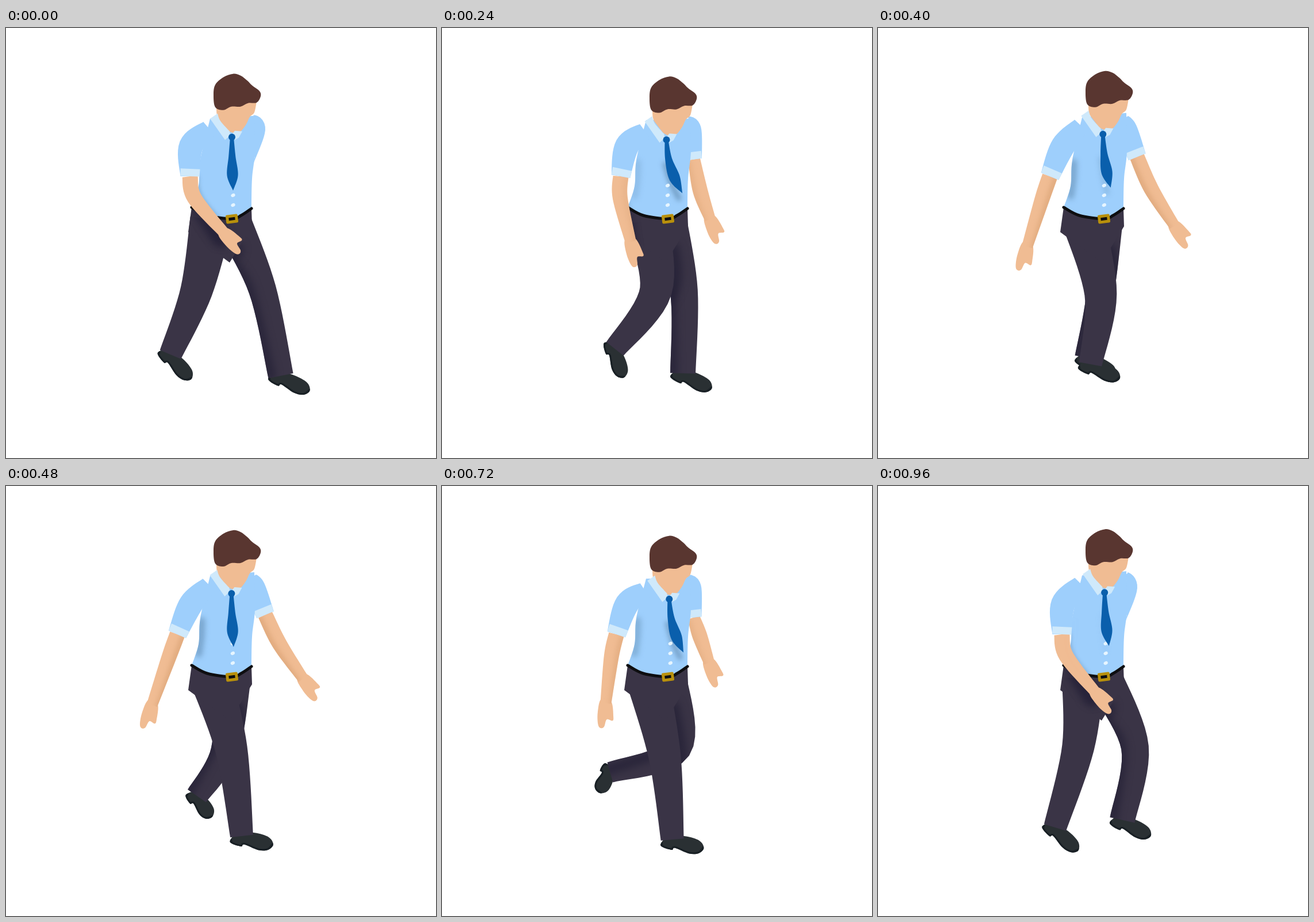
Recreate the animation shown at these times as an HTML page with a canvas. Size 748 by 748 pixels, loop 1040 ms.

```html
<!DOCTYPE html>
<html lang="en">
<head>
<meta charset="utf-8">
<title>Walk cycle</title>
<style>
html, body { margin: 0; width: 100%; height: 100%; overflow: hidden; background: #fff; }
canvas { display: block; width: 100vw; height: 100vh; }
</style>
</head>
<body>
<canvas id="stage" width="748" height="748"></canvas>
<script>
const ctx = document.getElementById('stage').getContext('2d');
const STEP = 80, STEPS = 13, TAU = Math.PI * 2;
const C = {
  shirt: '#9ecffc', cuff: '#cfe9fb', skin: '#f0bc93', hair: '#593630',
  pants: '#3a3446', shoe: '#2a3033', sole: '#192025', tie: '#0a5fac',
  belt: '#0e0e10', gold: '#b8900c', button: '#e6f5ff',
  pantsShade: '#262238', shirtShade: '#6d98be', skinShade: '#d39b6c'
};

// Each leg: hip and half widths, least foot tilt, and the path of knee and ankle.
const NEAR = {
  hip: [357, 335], widths: [37, 28, 20], tilt: 6,
  path: [[331,458, 286,568], [360,448, 286,562], [381,468, 326,561], [392,458, 410,609],
    [399,463, 425,610], [372,475, 367,617], [348,455, 308,594]]
};
const FAR = {
  hip: [394, 335], widths: [32, 24, 22], tilt: 18,
  path: [[446,455, 478,605], [441,460, 440,595], [399,455, 395,600], [380,462, 332,539],
    [383,443, 276,473], [437,470, 328,537], [447,455, 425,581]]
};

// Outlines; the shoe is relative to the ankle, the hand to the wrist.
const HAIR = [[395,78],[378,84],[364,97],[361,115],[364,136],[378,141],[392,135],[408,135],
  [421,129],[436,128],[443,117],[441,108],[428,98],[420,90],[408,81]];
const FACE = [[366,130],[367,150],[374,162],[388,178],[405,180],[417,167],[424,153],[432,145],[436,126]];
const SHOE = [[-19,9],[-7,-5],[22,-8],[47,-3],[56,9],[48,19],[31,21],[6,14],[1,18],[-15,15]];
const HAND = [[-6,-9],[18,-12],[38,-9],[44,-4],[41,2],[28,5],[29,15],[22,16],[-4,9]];

const add = (p, x, y) => [p[0] + x, p[1] + y];
const mix = (a, b, t) => a.map((v, i) => v + (b[i] - v) * t);
const clamp = (v, lo, hi) => Math.max(lo, Math.min(hi, v));
const unit = (a, b) => {
  const x = b[0] - a[0], y = b[1] - a[1], l = Math.hypot(x, y) || 1;
  return [x / l, y / l];
};
// Maps local points to the stage: x runs along u, y to its right-hand side.
const place = (pts, o, u, sx = 1, sy = 1) =>
  pts.map(([x, y]) => add(o, x * sx * u[0] - y * sy * u[1], x * sx * u[1] + y * sy * u[0]));

// Catmull-Rom value at u along a list of nodes.
function sample(nodes, u, loop) {
  const n = nodes.length, k = Math.min(Math.floor(u), loop ? n : n - 2), f = u - k;
  const at = i => nodes[loop ? (i + n) % n : clamp(i, 0, n - 1)];
  const [a, b, c, d] = [at(k - 1), at(k), at(k + 1), at(k + 2)];
  return b.map((v, i) => v + f / 2 * (c[i] - a[i]
    + f * (2 * a[i] - 5 * v + 4 * c[i] - d[i] + f * (3 * (v - c[i]) + d[i] - a[i]))));
}

// Tapered shape around a smooth centre line of [x, y, half width] nodes.
function limb(nodes) {
  const count = (nodes.length - 1) * 10, pts = [], left = [], right = [];
  for (let i = 0; i <= count; i++) pts.push(sample(nodes, i / 10));
  pts.forEach((p, i) => {
    const [x, y] = unit(pts[Math.max(0, i - 1)], pts[Math.min(count, i + 1)]);
    left.push(add(p, -y * p[2], x * p[2]));
    right.unshift(add(p, y * p[2], -x * p[2]));
  });
  const path = new Path2D();
  [...left, ...right].forEach(p => path.lineTo(p[0], p[1]));
  path.closePath();
  return path;
}
function curve(path, p, closed) {
  const n = p.length;
  const at = k => closed ? p[(k + n) % n] : p[clamp(k, 0, n - 1)];
  for (let k = 0; k < (closed ? n : n - 1); k++) {
    const [a, b, c, d] = [at(k - 1), at(k), at(k + 1), at(k + 2)];
    path.bezierCurveTo(b[0] + (c[0] - a[0]) / 6, b[1] + (c[1] - a[1]) / 6,
      c[0] - (d[0] - b[0]) / 6, c[1] - (d[1] - b[1]) / 6, c[0], c[1]);
  }
}
// Closed outline from smooth runs joined by straight lines.
function outline(...runs) {
  const path = new Path2D();
  runs.forEach(run => {
    path.lineTo(...run[0]);
    curve(path, run);
  });
  path.closePath();
  return path;
}
function blob(p) {
  const path = new Path2D();
  path.moveTo(...p[0]);
  curve(path, p, true);
  return path;
}
function fill(path, color) {
  ctx.fillStyle = color;
  ctx.fill(path);
}
function dot(x, y, rx, ry, turn, color) {
  const path = new Path2D();
  path.ellipse(x, y, rx, ry, turn, 0, TAU);
  fill(path, color);
}
function line(pts, color, width) {
  const path = new Path2D();
  path.moveTo(...pts[0]);
  curve(path, pts);
  ctx.strokeStyle = color;
  ctx.lineWidth = width;
  ctx.lineCap = ctx.lineJoin = 'round';
  ctx.stroke(path);
}
function shade(clip, pts, color, width, alpha, blur = 5) {
  ctx.save();
  ctx.clip(clip);
  ctx.globalAlpha = clamp(alpha, 0, 1);
  ctx.filter = `blur(${blur}px)`;
  line(pts, color, width);
  ctx.restore();
}

function poseLeg({ hip, widths, tilt, path }, step) {
  const [kx, ky, ax, ay] = sample(path, step / 2, true);
  const size = clamp(1 - (570 - ay) / 150, .7, 1);
  const angle = Math.max(tilt, .88 * (kx - ax)) * TAU / 360;
  const shape = limb([[...hip, widths[0]], [kx, ky, widths[1]], [ax, ay, widths[2] * (.4 + .6 * size)]]);
  return { knee: [kx, ky], ankle: [ax, ay], size, angle, shape };
}
function drawLeg({ ankle, size, angle, shape }) {
  const pts = place(SHOE, ankle, [Math.cos(angle), Math.sin(angle)], size), shoe = blob(pts);
  fill(shoe, C.shoe);
  ctx.save();
  ctx.clip(shoe);
  line([...pts.slice(4), pts[0]], C.sole, 6);
  ctx.restore();
  fill(shape, C.pants);
}

function drawArm({ neck, shoulder, cuff, elbow, wrist, side, swing }) {
  const skin = limb([[cuff[0], cuff[1], cuff[2] - 3], [...elbow, 13], [...wrist, 9.5]]);
  fill(skin, C.skin);
  fill(blob(place(HAND, wrist, unit(elbow, wrist), 1, -1)), C.skin);
  shade(skin, [cuff, elbow, wrist].map(p => add(p, side * 11, 4)), C.skinShade, 8, swing * .7);
  fill(limb([neck, shoulder, cuff]), C.shirt);
  const u = unit(shoulder, cuff);
  fill(limb([[cuff[0] - u[0] * 13, cuff[1] - u[1] * 13, cuff[2] + .5], cuff]), C.cuff);
}

// 0 with the arm forward, 1 with it swung out, eased at both ends.
function swingAt(t, peak) {
  const s = .5 + .5 * Math.cos(TAU * (t - peak));
  return s * s * (3 - 2 * s);
}

function draw(step) {
  const t = step / STEPS, wave = Math.sin(TAU * t);
  const bob = 3.3 + 6.5 * Math.cos(2 * TAU * (t - .145));
  const knot = [393 - 2.5 * wave, 188 + bob];
  const tieSwing = 15 - 13 * Math.cos(2 * TAU * t);
  const out = swingAt(t, .5), back = swingAt(t, .46);

  const near = poseLeg(NEAR, step), far = poseLeg(FAR, step);
  const nearArm = {
    neck: [353, 173 + bob, 15], shoulder: [322, 205, 21], cuff: [320 - 22 * out, 258, 16.5],
    elbow: [328 - 44 * out, 296], wrist: [380 - 126 * out, 357 + 24 * Math.sqrt(out)],
    side: 1, swing: out
  };
  const farArm = {
    neck: [423, 163 + bob, 14], shoulder: [432, 177, 19], cuff: [420 + 31 * back, 235 - 11 * back, 10 + 6 * back],
    elbow: [410 + 66 * back, 272 + 12 * wave],
    wrist: [392 + 125 * back, 305 + back * (25 + 22 * wave)], side: -1, swing: back
  };

  ctx.fillStyle = '#fff';
  ctx.fillRect(0, 0, 748, 748);
  drawArm(farArm);

  // trousers
  drawLeg(far);
  shade(far.shape, [[388, 405], add(far.knee, -24, 0), add(far.ankle, -18, 0)], C.pantsShade, 18, .8, 7);
  shade(far.shape, [[402, 385], add(near.knee, 28, 0), add(near.ankle, 20, 0)], C.pantsShade, 22, .8, 7);
  drawLeg(near);
  const buckle = [393, 332];
  const hem = [[323, 312], [350, 326], buckle, [409, 326], [427, 314]];
  const pelvis = outline(hem, [[428, 345]], [[389, 408]], [[317, 355]]);
  fill(pelvis, C.pants);
  for (const part of [pelvis, near.shape])
    shade(part, [nearArm.elbow, add(nearArm.wrist, -6, 8)], C.pantsShade, 28, .7, 7);

  // shirt, belt and buttons
  const torso = outline([[355, 157 + bob / 2], [338, 230], [335, 275], hem[0]], hem,
    [hem[4], [428, 262], [433, 215], [432, 151 + bob]]);
  fill(torso, C.shirt);
  shade(torso, [[340, 234], [339, 262], [335, 292]], C.shirtShade, 12, .8 * out);
  shade(torso, [nearArm.cuff, nearArm.elbow, nearArm.wrist].map(p => add(p, 13, 0)),
    C.shirtShade, 5, .6 * (1 - out), 3);
  line(hem, C.belt, 5);
  ctx.save();
  ctx.translate(...buckle);
  ctx.rotate(-.12);
  ctx.fillStyle = C.belt;
  ctx.strokeStyle = C.gold;
  ctx.fillRect(-8, -5, 16, 10);
  ctx.strokeRect(-8, -5, 16, 10);
  ctx.restore();
  const tie = [0, .36, .72, 1].map((u, i) =>
    [knot[0] + tieSwing * u * u, knot[1] + 93 * u, [3, 6, 9.5, 0][i]]);
  shade(torso, tie.slice(1).map(p => add(p, -6, 9)), C.shirtShade, 8, (tieSwing - 6) / 20, 4);
  for (let i = 0; i < 3; i++) dot(knot[0] + 2, 308 - i * 17, 3.8, 2.9, -.5, C.button);

  drawArm(nearArm);

  // head, collar and tie
  ctx.save();
  ctx.translate(0, bob);
  fill(outline(FACE), C.skin);
  ctx.translate(knot[0] - 391, -1);
  fill(outline([[353, 157]], [[366, 148], [371, 161], [387, 179]], [[388, 186]], [[379, 194]]), C.cuff);
  fill(outline([[392, 183]], [[396, 178]], [[409, 179]], [[403, 190]], [[396, 194]]), C.cuff);
  ctx.restore();
  fill(limb(tie), C.tie);
  dot(...knot, 6, 6, 0, C.tie);
  ctx.save();
  ctx.translate(0, bob);
  fill(blob(HAIR), C.hair);
  ctx.restore();
}

let shown = -1;
const start = performance.now();
function tick() {
  const step = Math.floor((performance.now() - start) / STEP) % STEPS;
  if (step !== shown) draw(shown = step);
  requestAnimationFrame(tick);
}
tick();
</script>
</body>
</html>
```
